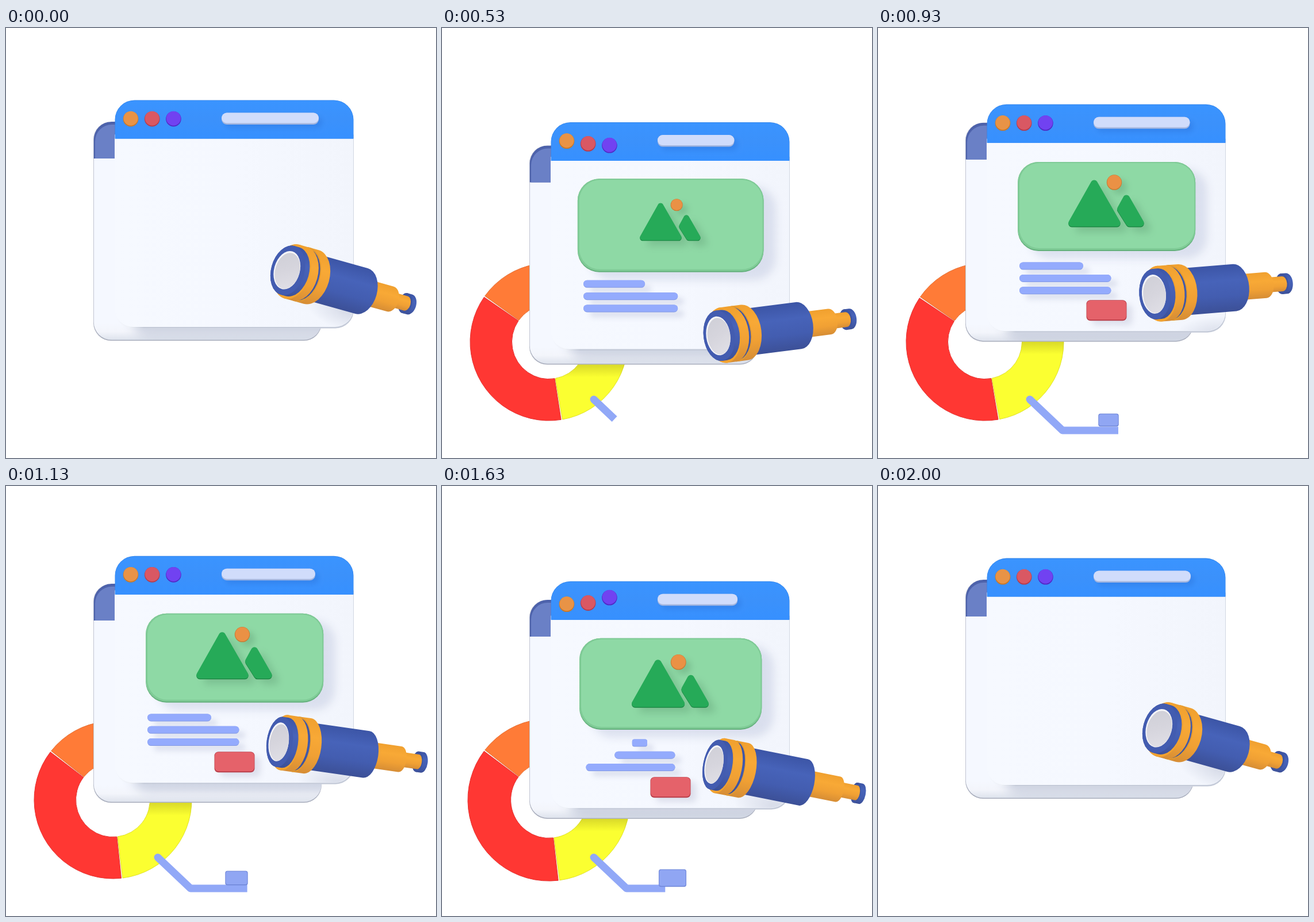
An HTML page with a canvas for the animation above (2030 ms loop, 748 px wide and 748 px high).

```html
<!DOCTYPE html>
<html lang="en">
<head>
<meta charset="utf-8">
<title>Browser and spyglass</title>
<style>
html, body { margin: 0; width: 100%; height: 100%; overflow: hidden; background: #fff; }
canvas { display: block; width: 100%; height: 100%; }
</style>
</head>
<body>
<canvas id="stage" width="748" height="748"></canvas>
<script>
const ctx = document.getElementById('stage').getContext('2d');
const TAU = Math.PI * 2, RAD = Math.PI / 180;
const LOOP = 2030, ACTIVE = 2000, POP = 367;

const clamp = x => Math.max(0, Math.min(1, x));
const mix = (a, b, p) => a + (b - a) * p;
const smooth = x => { x = clamp(x); return x * x * (3 - 2 * x); };
const wave = (t, shift) => Math.cos(TAU * (t - shift) / 1000);

// ease-out with overshoot
function back(x) {
  x = clamp(x);
  const y = x - 1, s = 2.15;
  return Math.max(0, 1 + (s + 1) * y * y * y + s * y * y);
}
const pop = (t, start, end) =>
  t < start + POP ? back((t - start) / POP) : back(1 - (t - end) / POP);

// smooth curve through [time, value] pairs
function curve(t, k) {
  const n = k.length - 1;
  if (t <= k[0][0]) return k[0][1];
  if (t >= k[n][0]) return k[n][1];
  let i = 0;
  while (t > k[i + 1][0]) i++;
  const slope = j => j < 1 || j >= n ? 0
    : (k[j + 1][1] - k[j - 1][1]) / (k[j + 1][0] - k[j - 1][0]);
  const d = k[i + 1][0] - k[i][0], u = (t - k[i][0]) / d, v = 1 - u;
  return k[i][1] * (1 + 2 * u) * v * v + k[i + 1][1] * u * u * (3 - 2 * u)
    + d * (slope(i) * u * v * v - slope(i + 1) * u * u * v);
}

function rect(x, y, w, h, r, fill) {
  if (w <= 0 || h <= 0) return;
  ctx.beginPath();
  ctx.roundRect(x, y, w, h, r);
  if (fill) { ctx.fillStyle = fill; ctx.fill(); }
}
function disc(x, y, r, fill) {
  ctx.beginPath();
  ctx.arc(x, y, Math.max(0, r), 0, TAU);
  ctx.fillStyle = fill;
  ctx.fill();
}
function shade(color, dx, dy, blur) {
  ctx.shadowColor = color;
  ctx.shadowOffsetX = dx;
  ctx.shadowOffsetY = dy;
  ctx.shadowBlur = blur;
}
const noShade = () => shade('transparent', 0, 0, 0);
function linear(x0, y0, x1, y1, ...stops) {
  const g = ctx.createLinearGradient(x0, y0, x1, y1);
  stops.forEach((c, i) => g.addColorStop(i / (stops.length - 1), c));
  return g;
}

function donut(t, edge) {
  const s = pop(t, 6, 1583);
  if (s < 0.01) return;
  const turn = curve(t, [[0, 165], [180, 138], [330, 108.4], [530, 80.7], [730, 77.5],
    [930, 79.8], [1330, 86.6], [1480, 86], [1630, 83], [2000, 40]]);
  const R = 137 * s, r = 64.5 * s;
  ctx.save();
  ctx.translate(186, 546);
  const ring = (from, to, color, rim) => {
    ctx.beginPath();
    ctx.arc(0, 0, R, from * RAD, to * RAD);
    ctx.arc(0, 0, r, to * RAD, from * RAD, true);
    ctx.closePath();
    ctx.fillStyle = color;
    ctx.fill();
    ctx.lineWidth = 1;
    ctx.strokeStyle = rim;
    ctx.stroke();
  };
  ring(turn + 135, turn + 269, '#ff7b37', '#e56d31');
  ring(turn - 90.5, turn - 0.5, '#fbff31', '#dfe126');
  ring(turn + 0.5, turn + 134, '#ff3733', '#e4302f');
  // window shadow on the ring
  ctx.beginPath();
  ctx.arc(0, 0, R, 0, TAU);
  ctx.arc(0, 0, r, 0, TAU, true);
  ctx.clip();
  const y = edge - 546;
  ctx.fillStyle = linear(0, y, 0, y + 22, 'rgba(130,120,20,.28)', 'rgba(130,120,20,0)');
  ctx.fillRect(-25, y, 190, 22);
  ctx.restore();
}

function callout(t) {
  const len = curve(t, [[455, 0], [530, 49], [620, 118], [720, 168], [800, 176], [930, 175.5],
    [1330, 178.5], [1560, 177], [1630, 146.5], [1720, 66], [1810, 0]]);
  if (len > 0.5) {
    const a = Math.min(len, 78.5) / 78.5;
    disc(264, 646, 6.5, '#91a8f7');
    ctx.beginPath();
    ctx.moveTo(264, 646);
    ctx.lineTo(264 + 57 * a, 646 + 54 * a);
    if (len > 78.5) ctx.lineTo(321 + len - 78.5, 700);
    ctx.lineWidth = 13;
    ctx.lineJoin = 'round';
    ctx.strokeStyle = '#91a8f7';
    ctx.stroke();
  }
  const w = curve(t, [[770, 0], [860, 43], [930, 35.5], [1030, 39], [1330, 39],
    [1550, 39], [1630, 48], [1700, 44], [1800, 0]]);
  if (w > 1) {
    const h = w * 0.63;
    rect(401 - w / 2, 682 - h / 2, w, h, 4, '#6f86d8');
    rect(401 - w / 2 + 1, 682 - h / 2 + 1, w - 2, h - 2.5, 3.5, '#90a6f3');
  }
}

function backWindow(y, frontTop) {
  const top = 163 + y;
  rect(152, top, 397, 381, 31, '#a9aebd');
  ctx.save();
  rect(152.7, top, 396, 379.5, 31);
  ctx.clip();
  ctx.fillStyle = linear(0, top + 350, 0, top + 380, '#f5f8ff', '#f3f5fb', '#dde2ec');
  ctx.fillRect(152, top, 400, 382);
  rect(152, top, 120, 64, [31, 0, 0, 0], '#4d62ab');
  rect(155, top + 5, 120, 59, [29, 0, 0, 0], '#6a80c6');
  shade('rgba(160,168,192,.45)', 28, 14, 18);
  rect(189, frontTop + 70, 416, 327, 32, '#f5f8ff');
  noShade();
  ctx.restore();
}

function frontWindow(t, top, S) {
  const body = linear(189, 0, 605, 0, '#f6f9ff', '#f5f8ff', '#f2f5fc');
  // lower rim, fading out on the left
  rect(189, top + 60, 416, 337, [0, 0, 32, 32],
    linear(189, 0, 240, 0, '#f5f8ff', '#eef1f7', '#c4cad8'));
  rect(189, top + 60, 415.3, 334.5, [0, 0, 32, 32], body);
  rect(189.5, top, 415, 67, [34, 34, 0, 0], '#2f80e6');
  rect(190, top + 0.8, 414, 66.2, [33, 33, 0, 0],
    linear(0, top, 0, top + 67, '#3a94ff', '#3b91fb', '#3690ff'));

  const w = 169 - 36 * S;
  shade('rgba(20,70,180,.18)', 6, 6, 9);
  rect(375, top + 22, w, 20.5, 9, '#a4b6df');
  noShade();
  rect(375, top + 22, w, 18, 9, '#d0dcfb');

  [['#e89346', '#c97828'], ['#d95863', '#b63b4c'], ['#7142f1', '#5229c4']].forEach(([c, dark], i) => {
    const hop = start => {
      const u = (t - start - i * 66.7) / 333;
      return u > 0 && u < 1 ? -8 * Math.sin(TAU * u) : 0;
    };
    const x = 217 + 37.2 * i, y = top + 32.3 + hop(165) + hop(1360);
    disc(x, y + 0.4, 13.3, dark);
    disc(x, y - 0.6, 12.5, c);
  });
}

function poly(pts, r) {
  const n = pts.length, [a, b] = [pts[n - 1], pts[0]];
  ctx.beginPath();
  ctx.moveTo((a[0] + b[0]) / 2, (a[1] + b[1]) / 2);
  pts.forEach((p, i) => ctx.arcTo(...p, ...pts[(i + 1) % n], r));
  ctx.closePath();
}

function picture(t, y, S) {
  const s = pop(t, 227, 1586);
  if (s > 0.01) {
    const w = 309 * s, h = 155 * s, x = 397.7 - w / 2, r = 36 * s;
    const top = 303.1 + y - h / 2 - 40 * (1 - s);
    shade('rgba(165,175,205,.32)', 20 * s, 13 * s, 15);
    rect(x, top, w, h, r, '#64b07c');
    noShade();
    rect(x, top, w, h - 2, r, '#7fcb96');
    rect(x + 3, top + 2, w - 5, h - 7, r - 2, '#8ed9a5');
  }
  const m = pop(t, 452, 1594);
  if (m < 0.01) return;
  ctx.save();
  ctx.translate(397, 298 + y + 6.5 * S - 28 * (1 - m));
  ctx.scale(m, m);
  const peaks = [
    [[-21, -46], [29, 41], [-70, 41]],
    [[35, -20], [70, 41], [37, 41], [18, 11]]
  ];
  peaks.forEach(p => {
    shade('rgba(70,125,90,.26)', 12, 9, 13);
    poly(p, 6);
    ctx.fillStyle = '#17813f';
    ctx.fill();
    noShade();
    ctx.translate(0, -1.3);
    poly(p, 6);
    ctx.fillStyle = '#26aa58';
    ctx.fill();
    ctx.translate(0, 1.3);
  });
  shade('rgba(70,125,90,.26)', 9, 8, 11);
  disc(14, -37, 13.2, '#c97a32');
  noShade();
  disc(14, -37.5, 12.3, '#ea9145');
  ctx.restore();
}

const growth = [[0, 0], [30, .12], [97, .736], [163, 1.135], [230, 1.03],
  [297, 1.03], [363, .965], [450, 1]];

function textLines(t, y) {
  [111, 159.5, 159.5].forEach((full, i) => {
    const right = full * curve(t - 167 - 66.7 * i, growth);
    const left = full * smooth((t - 1475 - 66.7 * i) / 228);
    const w = right - left;
    if (w < 1) return;
    const top = 400.3 + 21.3 * i + y, r = Math.min(6.5, w * 0.15);
    shade('rgba(170,178,205,.32)', 11, 9, 10);
    rect(246 + left, top, w, 13, r, '#8399e4');
    noShade();
    rect(246 + left, top, w, 12, r, '#94abfd');
  });
}

function button(t, y) {
  const s = pop(t, 545, 1622);
  if (s < 0.02) return;
  const w = 70 * s, h = 36 * s, x = 397.5 - w / 2, top = 484 + y - h / 2;
  shade('rgba(170,175,200,.32)', 10, 8, 11);
  rect(x, top, w, h, 7 * s, '#b9404c');
  noShade();
  rect(x + 0.7, top + 0.7, w - 1.4, h - 2.7, 6.5 * s, '#e5626a');
}

function spyglass(t, S, top) {
  const p = smooth((t - 333) / 200), q = smooth((t - 1000) / 200), r = smooth((t - 1667) / 200);
  const blend = (a, b, c) => mix(mix(mix(a, b, p), c, q), a, r);
  const angle = (blend(15.6, -4.5, 13.6) - 2.8 * S) * RAD;
  const c = blend(.752, .787, .886), k = Math.sqrt(1 - c * c);
  const x = blend(594.5, 594.5, 600) - 144 * c * Math.cos(angle);
  const y = 450.8 + 71 * S - 144 * c * Math.sin(angle);

  // soft shadow on the page
  ctx.save();
  rect(189, top + 67, 415, 327, [0, 0, 32, 32]);
  ctx.clip();
  ctx.translate(x + 105, y + 72);
  ctx.rotate(angle);
  ctx.scale(1, 0.45);
  const g = ctx.createRadialGradient(0, 0, 8, 0, 0, 75);
  g.addColorStop(0, 'rgba(165,172,195,.32)');
  g.addColorStop(1, 'rgba(165,172,195,0)');
  ctx.fillStyle = g;
  ctx.fillRect(-80, -80, 160, 160);
  ctx.restore();

  ctx.save();
  ctx.translate(x, y);
  ctx.rotate(angle);
  const oval = (s, rad, fill) => {
    ctx.beginPath();
    ctx.ellipse(s * c, 0, rad * k, rad, 0, 0, TAU);
    ctx.fillStyle = fill;
    ctx.fill();
  };
  const tube = (s1, s2, rad, tones, face) => {
    ctx.beginPath();
    ctx.ellipse(s2 * c, 0, rad * k, rad, 0, -Math.PI / 2, Math.PI / 2);
    ctx.ellipse(s1 * c, 0, rad * k, rad, 0, Math.PI / 2, Math.PI * 1.5);
    ctx.closePath();
    ctx.fillStyle = linear(0, -rad, 0, rad, ...tones);
    ctx.fill();
    if (face) oval(s1, rad, face);
  };
  const blue = ['#3c55a6', '#4763b9', '#435db0', '#3c5097'];
  const gold = ['#f0a02f', '#f8a936', '#f0a034', '#d68d35'];
  tube(282, 292, 18, blue, '#3e549f');
  tube(244, 283, 13, gold);
  tube(177, 246, 22.5, gold);
  tube(56, 177, 41, blue);
  tube(34, 56, 48.5, gold, '#e2992f');
  tube(28, 34, 46, ['#3c53a3', '#415aae', '#3b5098']);
  tube(10, 28, 48.5, gold, '#f2a22f');
  tube(0, 11, 44, blue, '#435cb0');
  oval(-2, 34, '#f4f4f7');
  ctx.beginPath();
  ctx.ellipse(1 - 2 * c, 1, 32 * k, 32, 0, 0, TAU);
  ctx.fillStyle = linear(-20, -30, 15, 30, '#cfcfd7', '#d6d5dd', '#e0dfe6');
  ctx.fill();
  ctx.restore();
}

function draw(t) {
  const S = (1 - wave(t, -4)) / 2;
  const y = 18.2 - 22.4 * wave(t, 100);
  const top = 125.5 + y;
  ctx.fillStyle = '#fff';
  ctx.fillRect(0, 0, 748, 748);
  donut(t, 544 + 42 * S);
  callout(t);
  backWindow(42 * S, top);
  frontWindow(t, top, S);
  picture(t, y, S);
  textLines(t, y);
  button(t, y);
  spyglass(t, S, top);
}

const began = performance.now();
function tick() {
  draw(Math.min((performance.now() - began) % LOOP, ACTIVE));
  requestAnimationFrame(tick);
}
tick();
</script>
</body>
</html>
```
